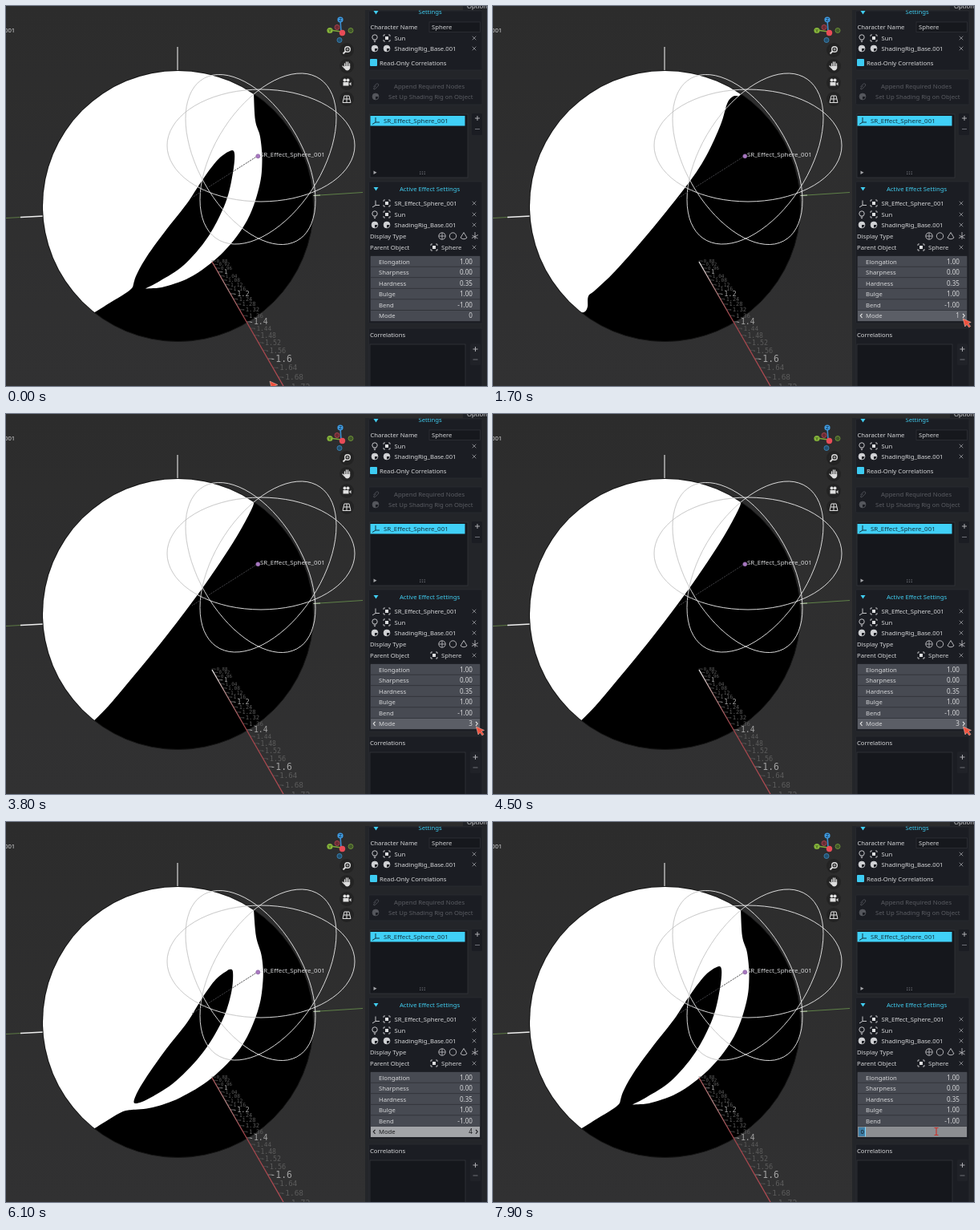
Animation of 600x474 px, one loop 8000 ms. Source, as an HTML page:

```html
<!DOCTYPE html>
<html lang="en">
<head>
<meta charset="utf-8">
<title>Shading rig modes</title>
<style>
html, body { margin: 0; width: 100%; height: 100%; overflow: hidden; background: #2d2d2d; }
svg { display: block; width: 600px; height: 474px; }
text { font: 7.7px "Noto Sans", "Open Sans", sans-serif; fill: #d6d7d9; white-space: pre; }
.name { font-size: 7.95px; }
.title { fill: #40cdf0; }
.off { fill: #5b5d63; }
.tick { font-family: "DejaVu Sans Mono", monospace; }
.num { text-anchor: end; font-size: 8.1px; }
</style>
</head>
<body>
<svg id="stage" viewBox="0 0 600 474" xmlns="http://www.w3.org/2000/svg"></svg>
<script>
const LOOP = 8000;
const stage = document.getElementById('stage');

// Smooth curve through points; continues from the first one.
function smooth(p) {
  let d = '';
  for (let i = 0; i < p.length - 1; i++) {
    const a = p[i - 1] || p[i], b = p[i], c = p[i + 1], e = p[i + 2] || c;
    d += `C${b[0] + (c[0] - a[0]) / 6} ${b[1] + (c[1] - a[1]) / 6} ` +
         `${c[0] - (e[0] - b[0]) / 6} ${c[1] - (e[1] - b[1]) / 6} ${c[0]} ${c[1]}`;
  }
  return d;
}
const TOP = [309, 109], LOW = [110, 382.5];
const OUTSIDE = 'L40 440L0 0L340 60Z';
const lit = (...runs) => `M${TOP}` + runs.map(smooth).join('') + OUTSIDE;

const half = lit([TOP, [308, 115], [298, 135], [279, 167], [243, 220], [196, 282], [150, 338], [128, 364], LOW]);
const SHAPES = [
  lit([TOP, [311, 143], [317, 163], [319.5, 193], [316, 225], [301, 267], [272, 306], [234, 336], [198, 350], [174, 352.5]],
      [[174, 352.5], [192, 343], [222, 323], [252, 288], [274, 245], [283, 208], [285, 184], [279, 181],
       [263, 193], [243, 220], [226, 246], [200, 279], [176, 312], [163, 335], [159, 347]],
      [[159, 347], [157, 352], [148, 359], [130, 370], LOW]),
  lit([TOP, [307, 112], [299, 113], [292, 122], [284, 148], [266, 187], [243, 222], [196, 281], [153, 330],
       [128, 354], [119, 362], [118, 375], [115, 381], LOW]),
  half,
  half,
  lit([TOP, [312, 143], [319, 168], [320.5, 198], [314, 236], [293, 281], [257, 319], [217, 344], [183, 356], [157, 359]],
      [[157, 359], [146, 361], [130, 370], LOW]) +
    'M278 184' + smooth([[278, 184], [283, 187], [281, 213], [270, 247], [246, 287], [212, 323], [180, 344], [161, 351],
       [162, 341], [174, 320], [200, 283], [226, 250], [245, 219], [262, 196], [278, 184]]) + 'Z'
];

// A tilted ring from its centre, half width, half height and lean.
function ring(cx, cy, w, h, lean) {
  const ph = Math.acos(lean);
  let d = '';
  for (let i = 0; i < 72; i++) {
    const a = i * Math.PI / 36;
    d += (i ? 'L' : 'M') + (cx + w * Math.cos(a)).toFixed(1) + ' ' + (cy + h * Math.cos(a - ph)).toFixed(1);
  }
  return d + 'Z';
}
const rings = ring(318, 174, 117, 70, 0) + ring(305, 191.5, 81, 106, .48) + ring(327, 190.5, 85, 106.5, -.48);

const text = (x, y, s, cls = '', more = '') => `<text x="${x}" y="${y}" class="${cls}" ${more}>${s}</text>`;
const rect = (x, y, w, h, fill, more = '') => `<rect x="${x}" y="${y}" width="${w}" height="${h}" fill="${fill}" ${more}/>`;
const disc = (x, y, r, fill, more = '') => `<circle cx="${x}" cy="${y}" r="${r}" fill="${fill}" ${more}/>`;
const line = (d, color = '#c4c5c8', w = 1, more = '') =>
  `<path d="${d}" fill="none" stroke="${color}" stroke-width="${w}" ${more}/>`;

function ruler() {
  let out = '';
  for (let k = 0; k < 22; k++) {
    const s = 1 / (1 - .0204 * k), y = 318 + 4.29 * k * s, x = 257 + (y - 319) * .574;
    const major = k % 5 === 3, v = .88 + .04 * k;
    const label = '-' + (major ? +v.toFixed(1) : v.toFixed(2));
    const size = (major ? 7.2 : 5.6) * s;
    out += text(x + 3, y + size * .36, label, 'tick',
      `style="font-size:${size.toFixed(2)}px;fill:${major ? '#a2a2a2' : '#5c5c5c'}"`);
    out += line(`M${x} ${y}h${3 + 2 * s}`, major ? '#999' : '#555', .7);
  }
  return out;
}

function gizmo() {
  return line('M418 32L417 17', '#3f8fd0', 1.6) + line('M418 32L404 30', '#7fa83a', 1.6) +
    disc(416, 42.5, 3, '#22506f', 'stroke="#3a7dab"') + disc(430, 30.5, 3, '#42582a', 'stroke="#6c8f37"') +
    disc(413, 26.5, 3, '#6b2c34', 'stroke="#a5414c"') +
    disc(419.5, 33.5, 3.7, '#e84c57') + disc(417, 17, 3.6, '#3f9ae0') + disc(404, 30.5, 3.6, '#86b53b') +
    line('M415.5 15.5h3l-3 3h3', '#12344f', .7) + line('M402.5 29l1.5 1.7 1.5-1.7M404 30.700v2', '#2c4010', .7);
}

function viewTools() {
  const w = '#dedede';
  return [55, 75, 96, 116].map(y => disc(425, y, 9, '#1f1f1f', 'opacity=".65"')).join('') +
    disc(426, 54, 3.3, 'none', `stroke="${w}" stroke-width="1.4"`) + line('M423.500 56.500L420.500 59.500', w, 1.8) +
    line('M424.500 54h3M426 52.500v3', w, .8) +
    line('M422.500 76v-4M424.500 75v-5M426.500 75v-5M428.500 76v-4M422 77l-2-2', w, 1.3, 'stroke-linecap="round"') +
    `<path d="M421.800 75h7.400v2.500q-1 3-3.700 3q-2 0-3.700-3z" fill="${w}"/>` +
    disc(422.500, 92.500, 2, w) + disc(426.500, 92.500, 2, w) + rect(420.5, 95, 7, 4.5, w) +
    `<path d="M428 97l2.500-2v4.500z" fill="${w}"/>` +
    line('M422 112h6l2 8.500h-10zM421 116h8M425 112v8.500', w, 1);
}

const cross = y => line(`M581.700 ${y - 2.300}l4.600 4.600m0-4.600l-4.600 4.600`, '#9b9ca1', .8);
const plus = (x, y) => line(`M${x - 3} ${y}h6M${x} ${y - 3}v6`, '#bbbcc0', .9);
const minus = (x, y) => line(`M${x - 3} ${y}h6`, '#777980', .9);
const fold = y => `<path d="M458.500 ${y - 2}h6l-3 4.600z" fill="#40cdf0"/>`;
const axes = (x, y, c) => line(`M${x} ${y - 4.500}v6h5M${x} ${y + 1.500}l-4 2.500`, c, 1);
const bulb = y => disc(460, y - 1, 3.2, 'none', 'stroke="#c4c5c8"') + line(`M458.500 ${y + 3}h3M459 ${y + 4.600}h2`, '#c4c5c8', .9);
const cube = (x, y) => rect(x - 2, y - 2, 4, 4, '#dddee0') +
  line(`M${x - 4} ${y - 2}v-2h2m4 0h2v2m0 4v2h-2m-4 0h-2v-2`, '#c4c5c8', .9);
const ball = (x, y, c = '#d0d1d4') => disc(x, y, 3.9, 'none', `stroke="${c}" stroke-width=".9"`) +
  `<path d="M${x} ${y - 3.900}a3.900 3.900 0 0 0 0 7.800l0-3.900h3.900a3.900 3.900 0 0 0-3.900-3.900z" fill="${c}"/>`;

const owner = (y, icon, name) => icon + text(484.5, y + 3, name) + cross(y);
const sun = y => owner(y, bulb(y) + cube(475, y), 'Sun');
const base = y => owner(y, ball(460, y) + ball(475, y), 'ShadingRig_Base.001');
const box = (y, h) => rect(452.5, y, 141.5, h, '#1b1d23', 'stroke="#292b31" stroke-width=".8" rx="1.500"');

function sidebar() {
  const rows = [['Elongation', '1.00'], ['Sharpness', '0.00'], ['Hardness', '0.35'], ['Bulge', '1.00'], ['Bend', '-1.00']];
  return rect(448, 5, 152, 469, '#222428', 'opacity=".85"') + rect(570, 0, 30, 5, '#202226') + text(575, 2.5, 'Options') +
    box(6, 74) + `<g clip-path="url(#under)">${text(514.5, 10, 'Settings', 'title')}${fold(8)}</g>` +
    text(454.5, 29, 'Character Name') + rect(528, 20, 63.5, 12.5, '#16181d', 'stroke="#31333a" stroke-width=".7"') +
    text(531, 29, 'Sphere') + sun(40) + base(53) +
    rect(454, 66, 9, 9, '#3dcbf2', 'rx="1"') + text(466, 73.5, 'Read-Only Correlations') +
    box(91, 32) + line('M458.500 101l3-3.500q2-1.500 3 0t-1 3l-3 3q-2 1-2-.500l3-3.500', '#55575d', .8) +
    text(484, 103, 'Append Required Nodes', 'off') + ball(461, 113, '#55575d') +
    text(477, 116, 'Set Up Shading Rig on Object', 'off') +
    rect(454, 135, 122, 79, '#15171c', 'stroke="#33353b" stroke-width=".8"') +
    rect(454.5, 137, 118, 12.500, '#40d0f7') + axes(461, 143.5, '#12333f') +
    text(471, 146.3, 'SR_Effect_Sphere_001', 'name', 'style="fill:#12333f"') +
    rect(581, 134, 13, 27, '#1b1d23', 'rx="1.500"') + plus(588, 140) + minus(588, 153.5) +
    '<path d="M458.500 205.500v4.600l4-2.300z" fill="#a5a6aa"/>' +
    line('M516 207h8M516 209.500h8', '#777980', 1, 'stroke-dasharray="1.300 1.500"') +
    box(219, 177) + fold(228) + text(528.5, 231, 'Active Effect Settings', 'title', 'text-anchor="middle"') +
    owner(246, axes(461, 247, '#c4c5c8') + cube(475, 246), 'SR_Effect_Sphere_001') + sun(260) + base(273) +
    text(454, 290, 'Display Type') +
    disc(544, 287, 4.200, 'none', 'stroke="#c4c5c8" stroke-width=".9"') + line('M540 287h8M544 283v8', '#c4c5c8', .8) +
    disc(557.500, 287, 4.200, 'none', 'stroke="#c4c5c8" stroke-width=".9"') +
    line('M571 282.500l-4 6.500q4 3.500 8 0z', '#c4c5c8', .9) + line('M585 282v9M581 289.500l8-4M581.500 286l7 4', '#c4c5c8', .8) +
    text(454, 304, 'Parent Object') + cube(534, 301) + text(543, 304, 'Sphere') + cross(301) +
    rect(454, 311.5, 138, 82, '#2b2d33', 'rx="1.500"') +
    rows.map(([n, v], i) => rect(455, 312 + 13.55 * i, 136, 12.800, '#474a52') +
      text(465, 321.6 + 13.55 * i, n) + text(582, 321.6 + 13.55 * i, v, 'num')).join('') +
    rect(455, 379.800, 136, 13.200, '#474a52', 'id="row"') +
    '<g id="value">' + text(465, 389.4, 'Mode') + text(582, 389.4, '0', 'num', 'id="mode"') + '</g>' +
    line('M460.500 383.800l-2.200 2.500 2.200 2.500M586 383.800l2.200 2.500-2.200 2.500', '#e6e6e6', 1.1, 'id="arrows"') +
    '<g id="edit">' + rect(456, 380.800, 8, 11.200, '#3f7ea6') + rect(464, 380.500, 1, 12, '#7fd8ff') +
      text(458.5, 389.4, '0', '', 'style="fill:#101418"') + '</g>' +
    box(402, 80) + text(454, 412.5, 'Correlations') +
    rect(454, 422, 119, 60, '#15171c', 'stroke="#33353b" stroke-width=".8"') +
    rect(579, 421, 13, 27, '#202228', 'rx="1.500"') + plus(585.5, 428) + minus(585.5, 441);
}

const red = '#f0503c';
stage.innerHTML = `
<defs>
  <linearGradient id="bg" x1="0" y1="0" x2="0" y2="1"><stop stop-color="#2c2c2c"/><stop offset="1" stop-color="#313132"/></linearGradient>
  <linearGradient id="axis" gradientUnits="userSpaceOnUse" x1="257" y1="319" x2="346" y2="474">
    <stop id="near" stop-color="#eee"/><stop offset=".2" stop-color="#b08484"/><stop offset=".45" stop-color="#a0444a"/><stop offset="1" stop-color="#b04a52"/>
  </linearGradient>
  <clipPath id="ballClip"><circle cx="214.500" cy="249.500" r="168.500"/></clipPath>
  <clipPath id="litClip" clip-path="url(#ballClip)"><path id="litArea" clip-rule="evenodd"/></clipPath>
  <clipPath id="under"><rect x="440" y="5.500" width="160" height="20"/></clipPath>
</defs>
${rect(0, 0, 600, 474, 'url(#bg)')}
${line('M0 264.500L18 263.500', '#5d7a45')}${line('M18 263.500L47 262', '#eee', 1.5)}
${line('M383 236.500L445 232.500', '#5f8148')}${line('M383 236.500L392 236', '#bccbb0')}
${line('M214 51V82', '#d8d8d8', 1.2)}
${disc(214.5, 249.5, 169, '#000', 'stroke="#161616" stroke-width="1"')}
<g clip-path="url(#ballClip)"><path id="lit" fill="#fff" fill-rule="evenodd"/></g>
${ruler()}
${line('M257 319L346 474', 'url(#axis)', 1.3)}
${line(rings, '#e4e4e4', .95)}
${line('M314 187L232 239', '#55555a', .8, 'stroke-dasharray="2 1.200"')}
<g clip-path="url(#litClip)">${line(rings, '#fff', 1.4)}${line(rings, '#b4b4b4', .7)}${line('M314 187L232 239', '#777', .8, 'stroke-dasharray="2 1.200"')}</g>
${text(317, 187.5, 'SR_Effect_Sphere_001', 'name')}
${disc(314.3, 187.3, 2.600, '#a878c0', 'stroke="#7d5a92" stroke-width=".5"')}
${text(-2, 33, '001')}
${gizmo()}${viewTools()}${sidebar()}
<g id="arrow"><path d="M0 0L10 4.500L6.500 5.800L9.500 9.500L7.500 11L4.800 7.300L2.500 10Z" fill="${red}" stroke="#f6d0c8" stroke-width=".5"/></g>
<g id="slide"><path d="M-6.500 0l4-3v2h1.500v2h-1.500v2zM6.500 0l-4-3v2h-1.500v2h1.500v2z" fill="#d8302c"/></g>
<g id="beam">${line('M-2.500-4.500h5M0-4.500v9M-2.500 4.500h5', '#c8322c', 1.2)}</g>`;

const el = id => document.getElementById(id);
const show = (id, on) => { el(id).style.display = on ? '' : 'none'; };
const at = (steps, t) => steps.filter(s => s[0] <= t).pop();

const MODES = [[0, 0], [1200, 1], [2500, 2], [3800, 3], [5200, 4], [6400, 3], [6550, 2], [6700, 1], [6850, 0]];
const PATH = [[0, 329, 468], [200, 350, 462], [1000, 586, 390], [2400, 586.500, 390], [5400, 586.500, 390], [5800, 553, 386], [LOOP, 553, 386]];
const FILLS = { idle: '#474a52', hover: '#5b5e66', press: '#a2a4a8', edit: '#8c8e92' };
const STATES = [[0, 'idle'], [900, 'hover'], [6000, 'press'], [7000, 'hover'], [7700, 'edit']];

function place(t) {
  const i = PATH.findIndex(p => p[0] > t);
  const a = PATH[i - 1], b = PATH[i], u = (t - a[0]) / (b[0] - a[0]), e = u * u * (3 - 2 * u);
  return [a[1] + (b[1] - a[1]) * e, a[2] + (b[2] - a[2]) * e];
}

let last = -1;
function draw(t) {
  const mode = at(MODES, t)[1], state = at(STATES, t)[1];
  if (mode !== last) {
    el('lit').setAttribute('d', SHAPES[mode]);
    el('litArea').setAttribute('d', SHAPES[mode]);
    el('mode').textContent = mode;
    el('near').setAttribute('stop-color', mode % 4 ? '#eee' : '#b0585c');
    last = mode;
  }
  el('row').setAttribute('fill', FILLS[state]);
  el('value').style.display = state === 'edit' ? 'none' : '';
  for (const s of el('value').children) s.style.fill = state === 'press' ? '#1c1d20' : '';
  el('arrows').setAttribute('stroke', state === 'press' ? '#1c1d20' : '#e6e6e6');
  show('arrows', state === 'hover' || state === 'press');
  show('edit', state === 'edit');

  const pos = `translate(${place(t)})`;
  const inField = t > 5550;
  show('arrow', !inField);
  show('slide', inField && state === 'hover');
  show('beam', state === 'edit');
  for (const id of ['arrow', 'slide', 'beam']) el(id).setAttribute('transform', pos);
}

function tick() {
  draw(performance.now() % LOOP);
  requestAnimationFrame(tick);
}
tick();
</script>
</body>
</html>
```
